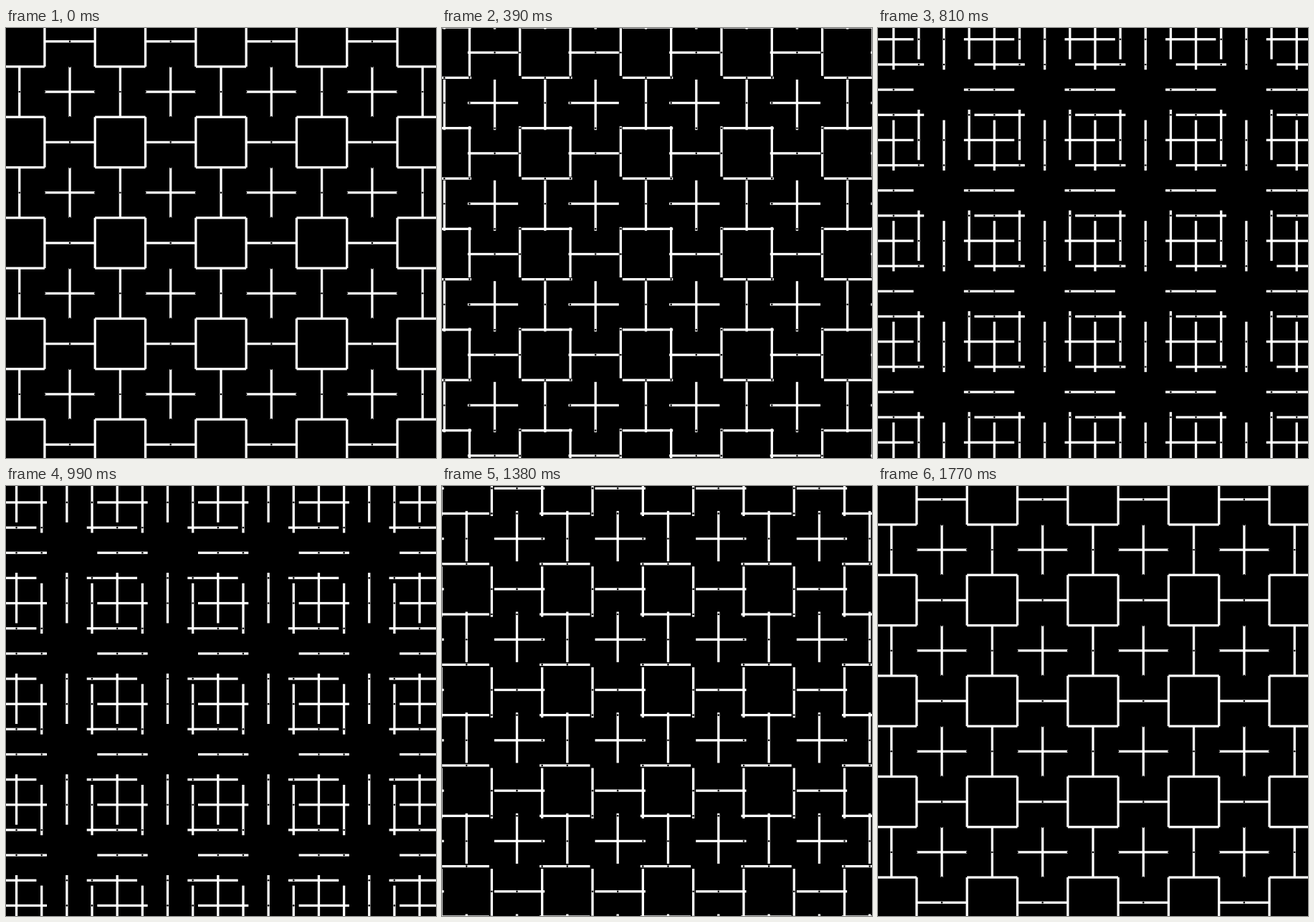
Animation, 600 px wide and 600 px high, one loop 1.8 s. Source, as an HTML page with a canvas:

```html
<!DOCTYPE html>
<html>
<head>
<meta charset="utf-8">
<style>
html, body { margin: 0; width: 100%; height: 100%; overflow: hidden; background: #000; }
canvas { display: block; }
</style>
</head>
<body>
<canvas id="stage" width="600" height="600"></canvas>
<script>
const ctx = document.getElementById('stage').getContext('2d');
const SIZE = 600, MID = 300;
const Q = 600 * 15 / 256;   // lattice step
const LEN = 2 * Q;          // bar length
const PERIOD = 4 * Q;
const WIDTH = 3.3;
const STEP = 30, STEPS = 60;
const REACH = 14;

const odd = n => Math.abs(n % 2);

function ease(step) {
  const v = Math.min(1, Math.max(0, (step - 7.5) / 45));
  return (1 - Math.cos(Math.PI * v)) / 2;
}

// Slide of a row along its own axis, before the common drift
const rowSlide = (k, s) => odd(k) ? LEN * s : LEN - LEN * s;
const colSlide = (j, s) => odd(j) ? -LEN * s : LEN + LEN * s;

function covers(pos, center) {
  const d = (pos - center) / PERIOD;
  return Math.abs(d - Math.round(d)) * PERIOD <= Q + 0.5;
}

function draw(step) {
  const drift = LEN * step / (STEPS - 1);
  const s = ease(step);
  const ox = MID - drift, oy = MID + drift;

  ctx.fillStyle = '#000';
  ctx.fillRect(0, 0, SIZE, SIZE);

  ctx.fillStyle = '#fff';
  for (let n = -REACH; n <= REACH; n++) {
    const x = ox + n * Q, y = oy + n * Q;
    for (let m = -5; m <= 5; m++) {
      const cx = ox + rowSlide(n, s) + m * PERIOD;
      const cy = oy + colSlide(n, s) + m * PERIOD;
      ctx.fillRect(cx - Q, y - WIDTH / 2, LEN, WIDTH);
      ctx.fillRect(x - WIDTH / 2, cy - Q, WIDTH, LEN);
    }
  }

  // Small notches where a bar passes a lattice point alone
  ctx.fillStyle = '#000';
  for (let j = -REACH; j <= REACH; j++) {
    for (let k = -REACH; k <= REACH; k++) {
      const h = covers(j * Q, rowSlide(k, s));
      const v = covers(k * Q, colSlide(j, s));
      if (h === v) continue;
      ctx.beginPath();
      ctx.arc(ox + j * Q, oy + k * Q, 1.3, 0, 2 * Math.PI);
      ctx.fill();
    }
  }
}

const start = performance.now();
function tick() {
  const t = Math.max(0, performance.now() - start);
  draw(Math.floor(t / STEP) % STEPS);
  requestAnimationFrame(tick);
}
tick();
</script>
</body>
</html>
```
